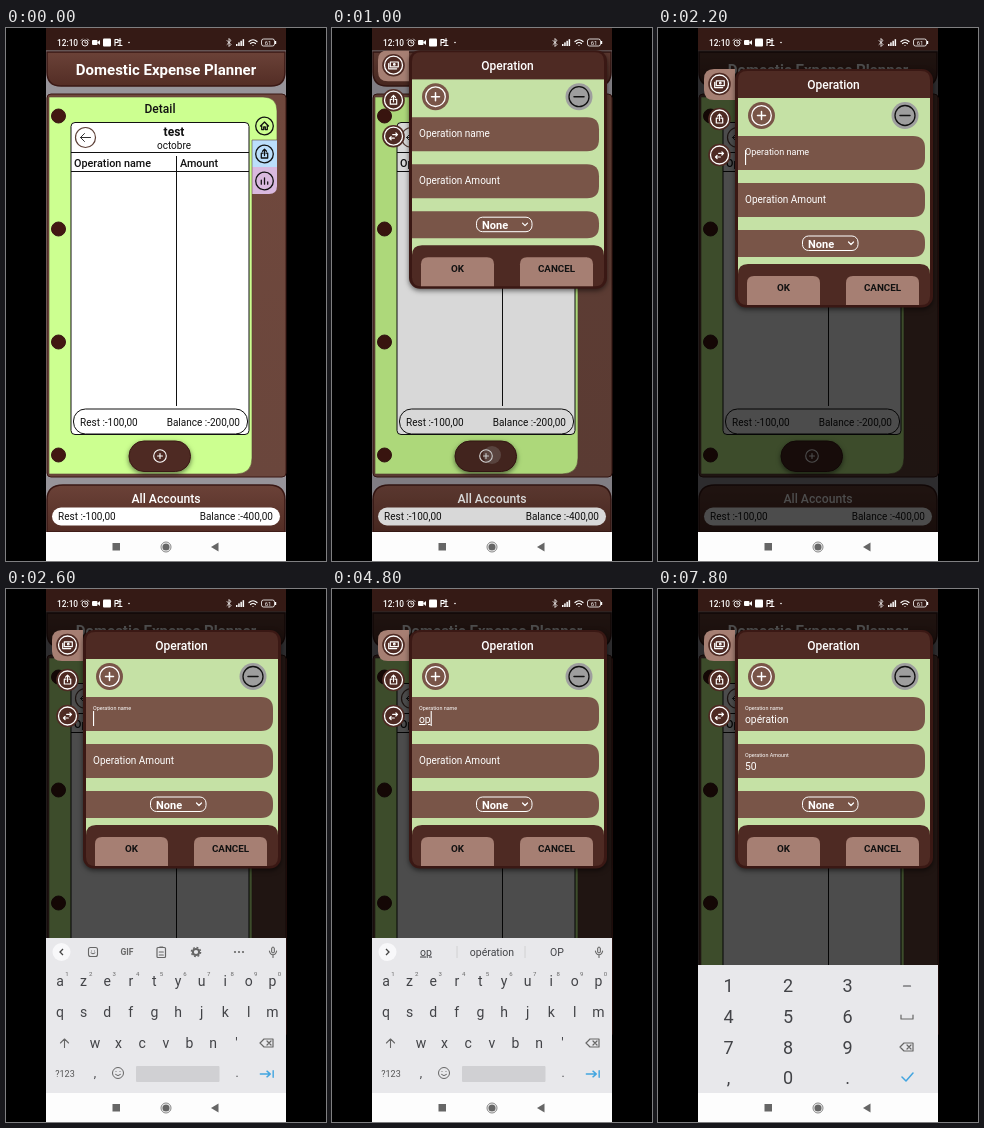
These frames come from a looping animation (320 by 533 pixels, 8000 ms). An HTML page:

```html
<!DOCTYPE html>
<html lang="en">
<head>
<meta charset="utf-8">
<title>Expense planner</title>
<style>
  html, body { margin: 0; width: 100%; height: 100%; overflow: hidden; background: #000; }
  svg { display: block; width: 100%; height: 100%; }
  text { font-family: Roboto, "Open Sans", sans-serif; white-space: pre; }
  .raised { filter: drop-shadow(0 2px 2.5px #0008); }
</style>
</head>
<body>
<svg id="stage" viewBox="0 0 320 533"></svg>
<script>
const LOOP = 8000;
const DARK = '#4e2a23', EDGE = '#3a1814', BROWN = '#795548', BLUSH = '#a67f73', LIME = '#ccff90', INK = '#424347';
const BLACK = '#111', WHITE = '#fff';

// Markup helpers
const text = (x, y, s, size, fill = BLACK, weight = 400, anchor = 'start', more = '') =>
  `<text x="${x}" y="${y}" font-size="${size}" fill="${fill}" font-weight="${weight}" text-anchor="${anchor}" ${more}>${s}</text>`;
const mid = (x, y, s, size, fill, weight, more) => text(x, y, s, size, fill, weight, 'middle', more);
const rect = (x, y, w, h, fill, r = 0, more = '') =>
  `<rect x="${x}" y="${y}" width="${w}" height="${h}" rx="${r}" fill="${fill}" ${more}/>`;
const circle = (x, y, r, fill, more = '') => `<circle cx="${x}" cy="${y}" r="${r}" fill="${fill}" ${more}/>`;
const path = (d, fill, more = '') => `<path d="${d}" fill="${fill}" ${more}/>`;
const line = (d, color, width = 1, more = '') =>
  path(d, 'none', `stroke="${color}" stroke-width="${width}" ${more}`);
const icon = (x, y, d, color, width = 1.2, scale = 1) =>
  `<g transform="translate(${x} ${y}) scale(${scale})">${line(d, color, width, 'stroke-linecap="round" stroke-linejoin="round"')}</g>`;
const group = (id, body, more = '') => `<g id="${id}" ${more}>${body}</g>`;
const ring = color => `stroke="${color}" stroke-width="1.3"`;

const ICONS = {
  plus: 'M-4 0H4M0-4V4',
  minus: 'M-5 0H5',
  back: 'M5 0H-5M-1-4L-5 0L-1 4',
  home: 'M-5 0L0-5L5 0M-3.5-1V4.5H-1V1H1V4.5H3.5V-1',
  share: 'M-2-1H-4V5H4V-1H2M0 2V-6M-2.5-3.5L0-6L2.5-3.5',
  bars: 'M-4 4V-1M0 4V-4M4 4V1',
  cash: 'M-4-4H6V2H-4ZM-6-2V4.5H4M0-1A1 1 0 1 0 2-1A1 1 0 1 0 0-1',
  swap: 'M-1-2H5L3-4M5-2L3 0M1 2.5H-5L-3 .5M-5 2.5L-3 4.5',
  erase: 'M-3-4H6V4H-3L-7 0ZM0-2L4 2M4-2L0 2',
  shift: 'M0 5V-4.5M-4.5 0L0-4.5L4.5 0',
  next: 'M-7 0H3.5M0-3L3.5 0L0 3M6.5-3.5V3.5',
  check: 'M-5 0L-1 4L6-4',
  space: 'M-6-1V3H6V-1',
  mic: 'M-1.5-4Q0-7 1.5-4V0Q0 2 -1.5 0ZM-4-1Q-3 3 0 3Q3 3 4-1M0 3V6',
};

function page() {
  const holes = [88, 201, 314, 427].map(y => circle(52.5, y, 7, '#421812', `stroke="${EDGE}"`)).join('');
  const tabs = [['home', 98], ['share', 126], ['bars', 153]].map(([name, y]) =>
    circle(258.5, y, 8.8, 'none', ring(BLACK)) + icon(258.5, y, ICONS[name], BLACK, 1.6, .8)).join('');
  const totals = (x, end, y, balance) =>
    text(x, y, 'Rest :-100,00', 10) + text(end, y, `Balance :-${balance},00`, 10, BLACK, 400, 'end');
  return rect(40, 22, 240, 482, '#97949a') +
    path('M41 24H279V44Q279 58 265 58H55Q41 58 41 44Z', 'url(#wood)', `stroke="${EDGE}" stroke-width="1.5"`) +
    mid(160, 47, 'Domestic Expense Planner', 15, WHITE, 700) +
    rect(41, 66, 239, 383, 'url(#cover)', 4, `stroke="${EDGE}"`) +
    path('M246 139H271V158Q271 166 263 166H246Z', '#d9b9df') +
    rect(245, 112, 26, 27, '#bbdefb') +
    path('M43 69H257Q271 69 271 83V112H246V430Q246 446 230 446H43Z', LIME, 'stroke="#5d4037" stroke-width=".6"') +
    holes + tabs +
    mid(154, 85, 'Detail', 12, BLACK, 500) +
    rect(65, 94.5, 178, 312, WHITE, 4, `stroke="${BLACK}"`) +
    circle(79.5, 109.5, 10, WHITE, 'stroke="#5d4037" stroke-width="1.2"') + icon(79.5, 109.5, ICONS.back, '#333', 1) +
    mid(168, 107.5, 'test', 12, BLACK, 700) + mid(168, 121, 'octobre', 10) +
    line('M65 124.5H243M65 143.5H243M170.5 128V378', BLACK) +
    text(68, 139, 'Operation name', 10.8, BLACK, 500) + text(174, 139, 'Amount', 10.8, BLACK, 500) +
    rect(67.5, 381, 174, 25, WHITE, 12, `stroke="${BLACK}"`) + totals(74, 234, 398, 200) +
    rect(123, 413, 61.5, 30.5, DARK, 15, `stroke="${EDGE}" class="raised"`) +
    circle(154, 428, 6.3, 'none', 'stroke="#fff" stroke-width="1.1"') + icon(154, 428, 'M-2.5 0H2.5M0-2.5V2.5', WHITE, 1.1) +
    group('ripple', circle(160, 427, 9, '#bbb'), 'opacity="0"') +
    path('M41 504V472Q41 457 57 457H263Q279 457 279 472V504Z', 'url(#wood)', `stroke="${EDGE}" stroke-width="1.5"`) +
    mid(160, 475, 'All Accounts', 12.2, WHITE, 500) +
    rect(46, 479.5, 228, 18, WHITE, 9) + totals(52, 267, 492, 400);
}

function dialog() {
  const tools = [['cash', 56], ['share', 91], ['swap', 127]].map(([name, y]) =>
    circle(61.5, y, 11.3, DARK) + circle(61.5, y, 9, 'none', ring(WHITE)) +
    icon(61.5, y, ICONS[name], WHITE, 1.5, .8)).join('');
  const field = (y, h) => path(`M80 ${y}H255Q267 ${y} 267 ${y + 12}V${y + h - 12}Q267 ${y + h} 255 ${y + h}H80Z`, BROWN);
  const button = (x, label) =>
    path(`M${x} 277V255Q${x} 248 ${x + 7} 248H${x + 66}Q${x + 73} 248 ${x + 73} 255V277Z`, BLUSH) +
    mid(x + 36.5, 263, label, 9.8, BLACK, 700);
  const input = (id, label, y) => group(id + 'Label', text(0, 0, label, 10, WHITE)) +
    text(87, y, '', 10.3, WHITE, 400, 'start', `id="${id}Text"`);
  return path('M77 41H56Q46 41 46 51V62Q46 72 56 72H77Z', BLUSH) + tools +
    rect(77, 41, 198, 238.5, EDGE, 11, 'class="raised"') + rect(80, 70, 192, 182, '#c5e1a5') +
    path('M80 70V52Q80 43 89 43H263Q272 43 272 52V70Z', DARK) +
    mid(175.5, 60.5, 'Operation', 12, WHITE, 500) +
    circle(103.5, 87.5, 13.5, BROWN) + circle(103.5, 87.5, 9.8, 'none', ring(WHITE)) + icon(103.5, 87.5, ICONS.plus, WHITE, 1.5) +
    circle(247, 87.5, 13.5, '#9e9e9e') + circle(247, 87.5, 10, 'none', ring(BLACK)) + icon(247, 87.5, ICONS.minus, BLACK, 1.5) +
    field(108, 34) + field(155, 34) + field(202, 27) +
    rect(144.5, 208, 55.5, 14.5, 'none', 6, `stroke="${WHITE}"`) +
    text(150, 219.5, 'None', 11, WHITE, 700) + icon(193, 215, 'M-2.5-1L0 1.5L2.5-1', WHITE) +
    path('M80 268V246Q80 236 90 236H262Q272 236 272 246V268Q272 277 263 277H89Q80 277 80 268Z', DARK) +
    button(89, 'OK') + button(188, 'CANCEL') +
    input('name', 'Operation name', 134) + input('amount', 'Operation Amount', 180.5) +
    rect(0, 0, 1.1, 15, WHITE, 0, 'id="caret"');
}

const keyX = i => 54 + i * 23.6;

function letterKeys() {
  const row = (letters, y, x0 = 54) =>
    [...letters].map((c, i) => mid(x0 + i * 23.6, y, c, 14, INK)).join('');
  const digits = [...'1234567890'].map((c, i) => mid(keyX(i) + 7, 387, c, 6, '#666')).join('');
  const strip = rect(82.5, 358.5, 9, 9, 'none', 2, 'stroke="#666" stroke-width="1.1"') +
    icon(87, 363, 'M-1.5-1V-1M1.5-1V-1M-2 1Q0 3 2 1', '#666', 1) +
    mid(121, 366, 'GIF', 8.5, '#666', 700) +
    rect(151, 358.5, 8.5, 10, 'none', 1, 'stroke="#666" stroke-width="1.2"') + icon(155.3, 364, 'M-2-1H2M-2 2H2M-1.5-6H1.5', '#666') +
    circle(190, 363, 3.1, 'none', 'stroke="#666" stroke-width="2"') + circle(190, 363, 4.6, 'none', 'stroke="#666" stroke-width="1.4" stroke-dasharray="1.8 1.81"') +
    [229, 233, 237].map(x => circle(x, 363, 1.1, '#666')).join('');
  const hints = line('M125 357V369M193 357V369', '#ccc', .8) +
    [94, 160, 225].map((x, i) => mid(x, 366.5, '', 10.5, INK, 400, `id="hint${i}"`)).join('');
  return rect(40, 349, 240, 155, '#e8e8eb') + circle(55.5, 363, 9, '#f8f8fa') +
    line('', '#444', 1.3, 'id="chevron"') + group('strip', strip) + group('hints', hints) +
    icon(267, 363, ICONS.mic, '#666', 1.2, .9) +
    row('azertyuiop', 397) + digits + row('qsdfghjklm', 427.5) + row("wxcvbn'", 458.5, 89) +
    icon(58.5, 454, ICONS.shift, '#666', 1.2, .9) + icon(261, 454, ICONS.erase, '#666') +
    mid(59, 488, '?123', 9, '#555') + mid(89, 488, ',', 12, INK) +
    circle(112, 484, 5.5, 'none', 'stroke="#666"') + icon(112, 484, 'M-2-1.5V-1.5M2-1.5V-1.5M-2.5 1.5Q0 4 2.5 1.5', '#666', 1) +
    rect(130, 477, 83.5, 16, '#d0d0d3', 1) + mid(231, 488, '.', 12, INK) + icon(261, 485, ICONS.next, '#42a5e0', 1.5, .95);
}

function numberKeys() {
  const cols = [70.5, 130, 189.5], rows = ['123', '456', '789', ',0.'];
  return rect(40, 376, 240, 128, '#e8e8eb') +
    rows.map((r, j) => [...r].map((c, i) => mid(cols[i], 403 + j * 30.8, c, 18, INK)).join('')).join('') +
    icon(249, 397, 'M-3.5 0H3.5', INK) + icon(249, 427, ICONS.space, '#666') +
    icon(249, 458, ICONS.erase, '#666') + icon(249, 488, ICONS.check, '#42a5e0', 1.5);
}

function systemBars() {
  const signal = [0, 1, 2, 3].map(i => rect(230 + i * 2.2, 16 - i * 1.6, 1.5, 2 + i * 1.6, WHITE)).join('');
  return rect(40, 0, 240, 22.5, '#351a15') + text(51, 18, '12:10', 8.3, WHITE, 500) +
    circle(79, 15, 3, 'none', 'stroke="#fff" stroke-width=".9"') + icon(79, 15, 'M0-1.5V0H1.5M-4-2.5L-2.5-4M4-2.5L2.5-4', WHITE, .8) +
    rect(86, 12, 5.5, 5, WHITE, 1) + path('M91 14.5L94 12V17Z', WHITE) +
    rect(97, 10.5, 8, 8, WHITE, 1) + icon(112, 14.5, 'M-3-3V3M-3-3H0V0H-3M2-4V3M1-2H3M0 3H4', WHITE, 1.1) + circle(123, 14.5, .8, WHITE) +
    icon(223, 14.5, 'M-2-2L2 2L0 4V-4L2-2L-2 2', WHITE, .8) + signal +
    icon(247, 15.5, 'M-4-2Q0-5.5 4-2M-2.5 0Q0-2 2.5 0M0 2V2', WHITE, 1.2) +
    rect(255.5, 11, 13, 7, 'none', 2, 'stroke="#fff" stroke-width=".8"') + rect(269, 13, 1.2, 3, WHITE) + mid(262, 16.8, '61', 6, WHITE) +
    rect(40, 504, 240, 29, '#fdfdfd') + rect(106.5, 515, 7.5, 7.5, '#666') +
    circle(160, 519, 3.6, '#666') + circle(160, 519, 5, 'none', 'stroke="#777" stroke-width=".9"') + path('M205 519L212.5 514.5V523.5Z', '#666');
}

const gradient = (id, from, to) =>
  `<linearGradient id="${id}" x2="0" y2="1"><stop stop-color="${from}"/><stop offset="1" stop-color="${to}"/></linearGradient>`;
document.getElementById('stage').innerHTML =
  `<defs>${gradient('wood', '#6b4238', '#532d25')}${gradient('cover', '#70483d', '#6a463c')}</defs>` +
  rect(0, 0, 320, 533, '#000') + page() + rect(40, 22, 240, 482, '#000', 0, 'id="dim"') +
  group('dialog', dialog()) + group('letters', letterKeys()) + group('numbers', numberKeys()) +
  group('popup', rect(-12, -17, 24, 30, '#fafafa', 4, 'stroke="#ccc" stroke-width=".6"') + mid(0, 4, '', 17, INK, 400, 'id="popupText"')) +
  group('press', circle(261, 485, 12, '#0002')) + systemBars();

const $ = id => document.getElementById(id);
const progress = (t, start, length) => Math.min(1, Math.max(0, (t - start) / length));
const show = (id, on) => $(id).setAttribute('display', on ? 'inline' : 'none');
const move = (id, x, y, scale = 1) => $(id).setAttribute('transform', `translate(${x} ${y}) scale(${scale})`);
const latest = (list, t) => list.filter(item => item[0] <= t).pop();

// [time, value] lists
const nameEdits = [[0, ''], [4250, 'o'], [4700, 'op'], [5250, 'opération']];
const amountEdits = [[0, ''], [6850, '5'], [7250, '50']];
const hintEdits = [[0, null], [4250, ['o', 'on', 'ou']], [4700, ['op', 'opération', 'OP']], [5250, null]];
const presses = [[4150, 'o', keyX(8), 368], [4550, 'p', keyX(9) - 2, 368], [6750, '5', 130, 401], [7150, '0', 130, 463]];
const FOCUS_NAME = 2150, FOCUS_AMOUNT = 5950;
const caretResets = [[FOCUS_NAME], [4250], [4700], [5250], [FOCUS_AMOUNT], [6850], [7250]];

function floatLabel(id, t, start, restY, floatY) {
  const p = progress(t, start, 250);
  move(id, 87, restY + (floatY - restY) * p, 1 - .46 * p);
}

function draw(now) {
  const t = now % LOOP;
  const typingAmount = t >= FOCUS_AMOUNT;

  show('dialog', t >= 826);
  move('dialog', 0, -260 * (1 - progress(t, 826, 300)) ** 3);
  $('dim').setAttribute('opacity', .7 * progress(t, 935, 300));
  $('ripple').setAttribute('opacity', t > 750 ? .35 * (1 - progress(t, 950, 200)) : 0);

  floatLabel('nameLabel', t, FOCUS_NAME, 128.3, 121);
  floatLabel('amountLabel', t, FOCUS_AMOUNT, 175.3, 168);
  $('nameText').textContent = latest(nameEdits, t)[1];
  $('amountText').textContent = latest(amountEdits, t)[1];
  const composing = t >= 4250 && t < 5250;
  $('nameText').setAttribute('text-decoration', composing ? 'underline' : 'none');

  const reset = latest(caretResets, t);
  const caretOn = reset && (t - reset[0]) % 1000 < 500;
  show('caret', caretOn);
  if (caretOn) {
    const width = $(typingAmount ? 'amountText' : 'nameText').getComputedTextLength();
    move('caret', 87 + width, typingAmount ? 169 : 122);
  }

  show('letters', t >= 2350 && !typingAmount);
  move('letters', 0, 155 * (1 - progress(t, 2350, 200)) ** 2);
  show('numbers', typingAmount);
  const hints = latest(hintEdits, t)[1];
  show('hints', hints);
  show('strip', !hints);
  $('chevron').setAttribute('d', hints ? 'M54 360L57 363L54 366' : 'M57 360L54 363L57 366');
  [0, 1, 2].forEach(i => $('hint' + i).textContent = hints ? hints[i] : '');
  $('hint0').setAttribute('text-decoration', 'underline');

  const press = latest(presses, t);
  const pressed = press && t < press[0] + 220;
  show('popup', pressed);
  if (pressed) {
    $('popupText').textContent = press[1];
    move('popup', press[2], press[3]);
  }
  show('press', t >= 5780 && t < FOCUS_AMOUNT);
}

function tick() {
  draw(performance.now());
  requestAnimationFrame(tick);
}
tick();
</script>
</body>
</html>
```
